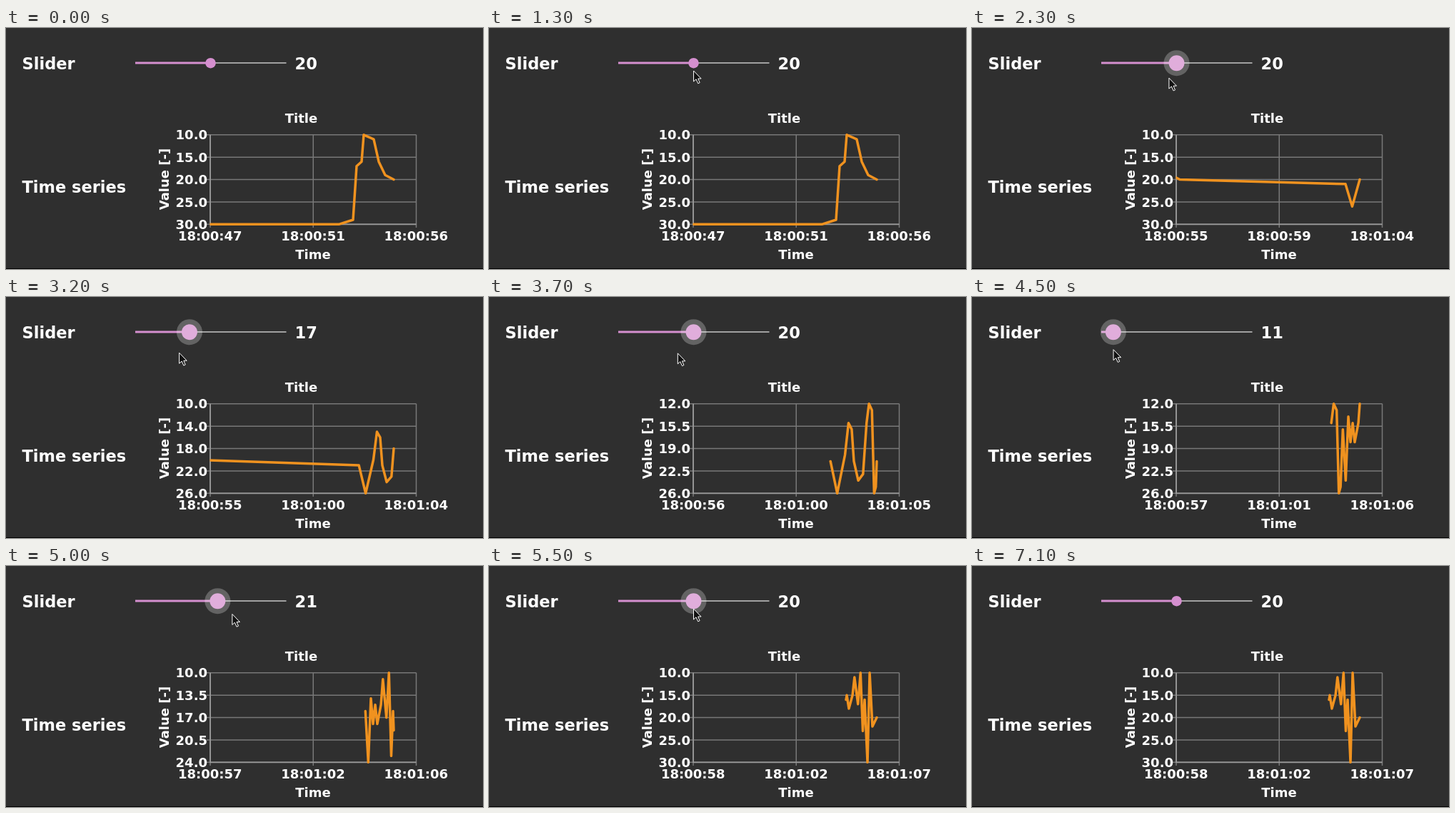
These frames come from a looping animation (668x338 px, 7.3 s). An HTML page:

```html
<!DOCTYPE html>
<html lang="en">
<head>
<meta charset="utf-8">
<title>Slider and time series</title>
<style>
  html, body { margin: 0; width: 100%; height: 100%; overflow: hidden; background: #2f2f2f; }
  svg { display: block; width: 668px; height: 338px; }
  text { font: bold 18px "DejaVu Sans", sans-serif; fill: #fff; }
  .label { font-size: 22.5px; }
  .mid { text-anchor: middle; }
  .end { text-anchor: end; }
</style>
</head>
<body>
<svg viewBox="0 0 668 338">
  <clipPath id="plot"><rect x="285.5" y="147" width="290" height="131"/></clipPath>
  <rect width="668" height="338" fill="#2f2f2f"/>
  <rect y="337" width="668" height="1" fill="#000"/>

  <text class="label" x="22.5" y="57.5">Slider</text>
  <text class="label" x="22.5" y="231">Time series</text>
  <text class="label" id="value" x="404.5" y="57.5"></text>

  <rect x="181" y="48.2" width="211.5" height="1.6" fill="#bdbdbd"/>
  <rect id="filled" x="181" y="47.5" height="3" fill="#d58fcf"/>
  <circle id="halo" cy="49.2" fill="#fff" fill-opacity=".25"/>
  <circle id="thumb" cy="49.2"/>

  <text class="mid" x="413.5" y="132.5">Title</text>
  <text class="mid" x="430" y="323.5">Time</text>
  <text class="mid" transform="translate(227.8 212) rotate(-90)">Value [-]</text>
  <g id="grid" fill="none"></g>
  <polyline id="line" clip-path="url(#plot)" fill="none" stroke="#f0921f" stroke-width="3.5"
    stroke-linejoin="round" stroke-linecap="round"/>

  <path id="cursor" d="M0 0V15L3.5 11.8L6.2 17.8L8.6 16.7L6.2 11H10.6Z"
    fill="#111" stroke="#fff" stroke-width="1"/>
</svg>
<script>
const LOOP = 7300, STEP = 100, BUFFER = 13;
const LEFT = 286, TOP = 149.8, WIDTH = 288.5, HEIGHT = 125.5;
const NOW_X = 543, PX_PER_MS = 0.032;
const IDLE = -5575, ENTER = 600, GRAB = 1600, RELEASE = 5500, LEAVE = 6300;

// Turning points of the slider as [ms, value]: an earlier drag, then the one on screen
const turns = [
  [IDLE - 9000, 30], [IDLE - 2406, 30], [IDLE - 1781, 29], [IDLE - 1625, 17], [IDLE - 1406, 16],
  [IDLE - 1313, 10], [IDLE - 875, 11], [IDLE - 656, 16], [IDLE - 375, 19], [IDLE, 20],
  [1675, 21], [1970, 26], [2310, 20], [2465, 15], [2605, 16], [2700, 21], [2890, 24], [3100, 23],
  [3255, 15], [3360, 12], [3490, 13], [3585, 26], [3660, 25], [3760, 16], [3885, 24], [4000, 14],
  [4095, 18], [4156, 16], [4190, 15], [4280, 18], [4440, 15], [4525, 11], [4680, 17], [4790, 10],
  [4890, 23], [4970, 16], [5095, 30], [5190, 10], [5312, 22], [RELEASE, 20]];

const $ = id => document.getElementById(id);
const clamp = (v, lo, hi) => Math.min(hi, Math.max(lo, v));
const mix = (a, b, u) => a + (b - a) * u;
const progress = (t, from, to) => clamp((t - from) / (to - from), 0, 1);
const bump = u => Math.sin(Math.PI * u);
const set = (el, attrs) => { for (const k in attrs) el.setAttribute(k, attrs[k]); };
const handleX = v => 286.5 + (v - 20) * 9.85;

function add(tag, attrs) {
  const el = document.createElementNS("http://www.w3.org/2000/svg", tag);
  set(el, attrs);
  return $("grid").appendChild(el);
}

function valueAt(t) {
  const i = turns.findIndex(p => p[0] > t);
  if (i < 0) return turns[turns.length - 1][1];
  const [a, b] = [turns[i - 1], turns[i]];
  return mix(a[1], b[1], progress(t, a[0], b[0]));
}

const xLabels = [], yLabels = [];
for (let i = 0; i < 5; i++) {
  const y = TOP + HEIGHT * i / 4;
  add("path", { d: `M281 ${y}H${LEFT + WIDTH}`, stroke: "#787878", "stroke-width": 1.5 });
  yLabels.push(add("text", { class: "end", x: 282, y: y + 6.6 }));
}
for (let i = 0; i < 3; i++) {
  const x = LEFT + WIDTH * i / 2;
  add("path", { d: `M${x} ${TOP}V280`, stroke: "#787878", "stroke-width": 1.5 });
  xLabels.push(add("text", { class: "mid", x: x - 0.2, y: 298 }));
}
add("path", { d: `M${LEFT} ${TOP}V${TOP + HEIGHT}H${LEFT + WIDTH}`, stroke: "#999", "stroke-width": 1.8 });

function clock(seconds) {
  const s = Math.floor(seconds), pad = n => String(n).padStart(2, "0");
  return `18:${pad(Math.floor(s / 60))}:${pad(s % 60)}`;
}

function drawChart(now) {
  const shown = turns.filter(p => p[0] <= now).slice(-BUFFER);
  shown.push([now, Math.round(valueAt(now))]);
  const values = shown.map(p => p[1]);
  const min = Math.min(...values), range = Math.max(...values) - min;
  const start = 52.75 + now / 1000;
  yLabels.forEach((el, i) => el.textContent = (min + range * i / 4).toFixed(1));
  xLabels.forEach((el, i) => el.textContent = clock(start + 4.5 * i));
  set($("line"), { points: shown.map(([time, v]) =>
    `${NOW_X + (time - now) * PX_PER_MS},${TOP + HEIGHT * (v - min) / range}`).join(" ") });
}

function drawSlider(t, now) {
  const v = Math.round(valueAt(now + 16)), x = handleX(v);
  const grip = progress(t, GRAB - 100, GRAB + 100) * (1 - progress(t, RELEASE, RELEASE + 200));
  $("value").textContent = v;
  set($("filled"), { width: x - 181 });
  set($("halo"), { cx: x, r: 18 * grip });
  set($("thumb"), { cx: x, r: mix(7.3, 11, grip), fill: grip > 0.5 ? "#e0addb" : "#d58fcf" });
}

// Swings in to the handle, drags it with a loose grip, then leaves to the lower right
function drawCursor(t, now) {
  const enter = progress(t, ENTER, 1300), leave = progress(t, RELEASE, 6200);
  const sway = bump(progress(t, GRAB, RELEASE));
  const gripX = handleX(valueAt(now + 35)) - 5 * sway, gripY = 60 + 19 * sway;
  const x = mix(mix(81, gripX, enter) + 200 * bump(enter), 549, leave);
  const y = mix(mix(234, gripY, enter) - 120 * bump(enter), 241, leave);
  set($("cursor"), {
    transform: `translate(${x} ${y})`,
    visibility: t >= ENTER && t < LEAVE ? "visible" : "hidden"
  });
}

function draw(elapsed) {
  const t = Math.floor(elapsed % LOOP / STEP) * STEP;
  const now = t < GRAB ? IDLE : Math.min(t, RELEASE);
  drawChart(now);
  drawSlider(t, now);
  drawCursor(t, now);
}

const begin = performance.now();
function tick() {
  draw(performance.now() - begin);
  requestAnimationFrame(tick);
}
tick();
</script>
</body>
</html>
```
